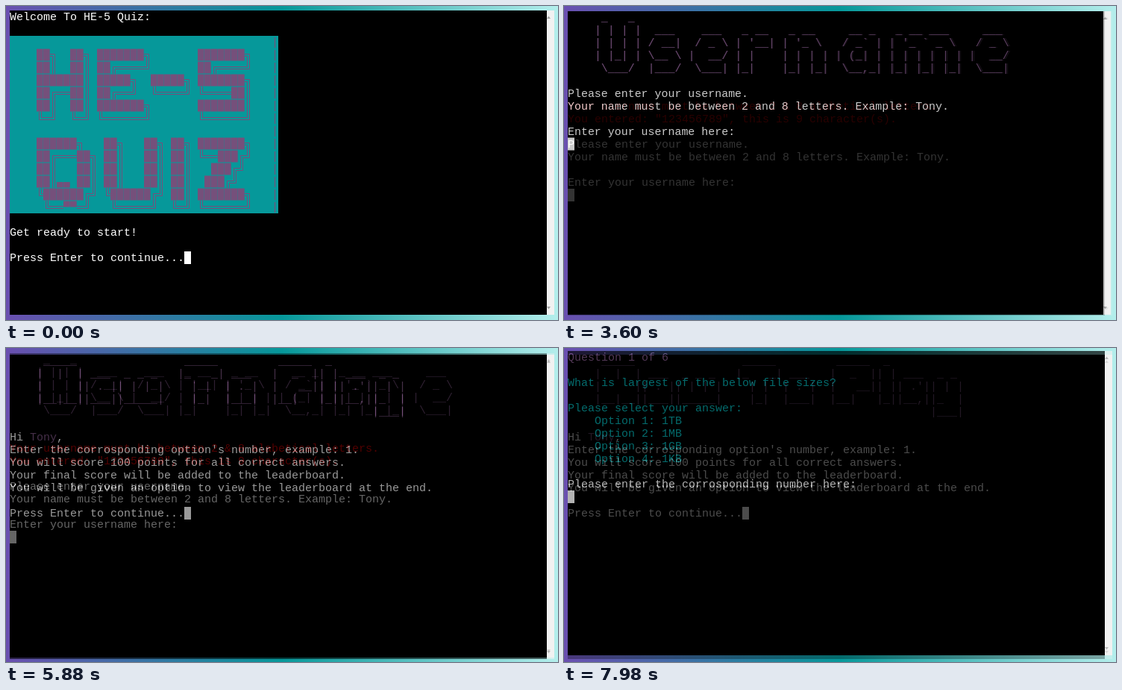
Animation, 740 px wide and 421 px high, one loop 8 s. Source, as an HTML page:

```html
<!DOCTYPE html>
<html lang="en">
<head>
<meta charset="utf-8">
<title>Terminal quiz</title>
<style>
  html, body { margin: 0; width: 100%; height: 100%; overflow: hidden; background: #000; }
  svg { display: block; width: 740px; height: 421px; }
  text { font: 15px "Liberation Mono", "Courier New", monospace; white-space: pre; }
</style>
</head>
<body>
<svg id="stage" viewBox="0 0 740 421">
  <defs>
    <linearGradient id="page">
      <stop offset="0" stop-color="#6a4fb0"/>
      <stop offset=".5" stop-color="#06989a"/>
      <stop offset="1" stop-color="#b4eeec"/>
    </linearGradient>
  </defs>
</svg>
<script>
const CELL_W = 9, CELL_H = 17, COLS = 80, ROWS = 24;
const WHITE = "#fff", RED = "#c00", PURPLE = "#75507b", CYAN = "#06989a";
const LOOP = 8000, STEP = 60, FADE_STEPS = 10;
const FADES = [1500, 3540, 5580, 7620];

const stage = document.getElementById("stage");

function add(parent, tag, attrs, content) {
  const el = document.createElementNS("http://www.w3.org/2000/svg", tag);
  for (const key in attrs) el.setAttribute(key, attrs[key]);
  if (content) el.textContent = content;
  return parent.appendChild(el);
}

const rect = (parent, x, y, width, height, fill) =>
  add(parent, "rect", { x, y, width, height, fill });

const write = (parent, row, content, fill = WHITE, col = 0) =>
  add(parent, "text", { x: col * CELL_W, y: row * CELL_H + 13, fill }, content);

const writeLines = (parent, row, lines, fill, col) =>
  lines.forEach((line, i) => line && write(parent, row + i, line, fill, col));

// Block and double-line characters as paths inside one cell
const BLOCKS = {
  "█": "M0 .5h8.7v16h-8.7z",
  "▄": "M0 9h8.7v7.5h-8.7z",
  "▀": "M0 .5h8.7v8h-8.7z"
};
const LINES = {
  "║": "M3.5 0V17M6.5 0V17",
  "═": "M0 7.5H9M0 10.5H9",
  "╔": "M3.5 17V7.5H9M6.5 17V10.5H9",
  "╗": "M6.5 17V7.5H0M3.5 17V10.5H0",
  "╚": "M3.5 0V10.5H9M6.5 0V7.5H9",
  "╝": "M6.5 0V10.5H0M3.5 0V7.5H0"
};

const TITLE = [
  "██╗  ██╗ ███████╗       ███████╗",
  "██║  ██║ ██╔════╝       ██╔════╝",
  "███████║ █████╗  █████╗ ███████╗",
  "██╔══██║ ██╔══╝  ╚════╝ ╚════██║",
  "██║  ██║ ███████╗       ███████║",
  "╚═╝  ╚═╝ ╚══════╝       ╚══════╝",
  "",
  "██████╗   ██╗   ██╗ ██╗ ███████╗",
  "██╔═══██╗ ██║   ██║ ██║ ╚══███╔╝",
  "██║   ██║ ██║   ██║ ██║   ███╔╝",
  "██║▄▄ ██║ ██║   ██║ ██║  ███╔╝",
  "╚██████╔╝ ╚██████╔╝ ██║ ███████╗",
  " ╚══▀▀═╝   ╚═════╝  ╚═╝ ╚══════╝"
];

const USERNAME = [
  " _   _",
  "| | | |  ___    ___   _ __   _ __     __ _   _ __ ___     ___",
  "| | | | / __|  / _ \\ | '__| | '_ \\   / _` | | '_ ` _ \\   / _ \\",
  "| |_| | \\__ \\ |  __/ | |    | | | | | (_| | | | | | | | |  __/",
  " \\___/  |___/  \\___| |_|    |_| |_|  \\__,_| |_| |_| |_|  \\___|"
];

const HOW_TO_PLAY = [
  " _____                _____         _____  _",
  "|  |  | ___  _ _ _   |_   _| ___   |  _  || | ___  _ _",
  "|     || . || | | |    | |  | . |  |   __|| || .'|| | |",
  "|__|__||___||_____|    |_|  |___|  |__|   |_||__,||_  |",
  " ".repeat(50) + "|___|"
];

const PROMPT = [
  "Please enter your username.",
  "Your name must be between 2 and 8 letters. Example: Tony.",
  "",
  "Enter your username here:"
];

function drawTitle(parent) {
  rect(parent, 0, 2 * CELL_H, 40 * CELL_W, 14 * CELL_H, CYAN);
  for (let row = 2; row < 16; row++) write(parent, row, "|", PURPLE, 39);
  TITLE.forEach((line, row) => [...line].forEach((char, col) => {
    const transform = `translate(${(col + 4) * CELL_W} ${(row + 3) * CELL_H})`;
    if (BLOCKS[char]) add(parent, "path", { d: BLOCKS[char], fill: PURPLE, transform });
    if (LINES[char]) add(parent, "path", { d: LINES[char], fill: "none", stroke: PURPLE, transform });
  }));
}

// One full page: gradient, terminal, scrollbar, text and cursor
function makeScene({ top, scale = 1, cursor, draw }) {
  const width = COLS * CELL_W, height = ROWS * CELL_H;
  const scene = add(stage, "g", {});
  rect(scene, 0, 0, 740, 421, "url(#page)");
  const term = add(scene, "g", { transform: `translate(5 ${top}) scale(${scale})` });
  rect(term, 0, 0, width, height, "#000");
  rect(term, width, 0, 10, height, "#f1f1f1");
  add(term, "path", {
    d: `M${width} 11l2.5-3 3.5 3.5zM${width} ${height - 11}h5l-2.5 3.5z`.replace("11l2.5-3 3.5 3.5z", "11h5l-2.5-3.5z"),
    fill: "#a3a3a3"
  });
  draw(term);
  rect(term, cursor[0] * CELL_W, cursor[1] * CELL_H, CELL_W, CELL_H, WHITE);
  return scene;
}

const scenes = [
  {
    top: 6, cursor: [26, 19],
    draw(term) {
      write(term, 0, "Welcome To HE-5 Quiz:");
      drawTitle(term);
      writeLines(term, 17, ["Get ready to start!", "", "Press Enter to continue..."]);
    }
  },
  {
    top: 7, scale: 718 / 720, cursor: [0, 10],
    draw(term) {
      writeLines(term, 0, USERNAME, PURPLE, 4);
      writeLines(term, 6, PROMPT);
    }
  },
  {
    top: 7, cursor: [0, 14],
    draw(term) {
      writeLines(term, 0, USERNAME, PURPLE, 4);
      writeLines(term, 7, [
        "Your username must be between 2 & 8 alabetical letters.",
        'You entered: "123456789", this is 9 character(s).'
      ], RED);
      writeLines(term, 10, PROMPT);
    }
  },
  {
    top: 9, cursor: [26, 12],
    draw(term) {
      writeLines(term, 0, HOW_TO_PLAY, PURPLE, 4);
      write(term, 6, "Hi     ,");
      write(term, 6, "Tony", PURPLE, 3);
      writeLines(term, 7, [
        "Enter the corrosponding option's number, example: 1.",
        "You will score 100 points for all correct answers.",
        "Your final score will be added to the leaderboard.",
        "You will be given an option to view the leaderboard at the end.",
        "",
        "Press Enter to continue..."
      ]);
    }
  },
  {
    top: 4, cursor: [0, 11],
    draw(term) {
      write(term, 0, "Question 1 of 6", PURPLE);
      write(term, 2, "What is largest of the below file sizes?", CYAN);
      write(term, 4, "Please select your answer:", CYAN);
      writeLines(term, 5, ["1TB", "1MB", "1GB", "1KB"].map((size, i) => `Option ${i + 1}: ${size}`), CYAN, 4);
      write(term, 10, "Please enter the corrosponding number here:");
    }
  }
].map(makeScene);

function render(time) {
  const t = time % LOOP;
  const current = FADES.filter(start => start <= t).length;
  const steps = current ? Math.floor((t - FADES[current - 1]) / STEP) + 1 : FADE_STEPS;
  const alpha = Math.min(1, steps / FADE_STEPS);
  scenes.forEach((scene, i) => {
    const visible = i === current || (i === current - 1 && alpha < 1);
    scene.setAttribute("display", visible ? "inline" : "none");
    scene.setAttribute("opacity", i === current ? alpha : 1);
  });
}

const start = performance.now();
function tick() {
  render(performance.now() - start);
  requestAnimationFrame(tick);
}
tick();
</script>
</body>
</html>
```
